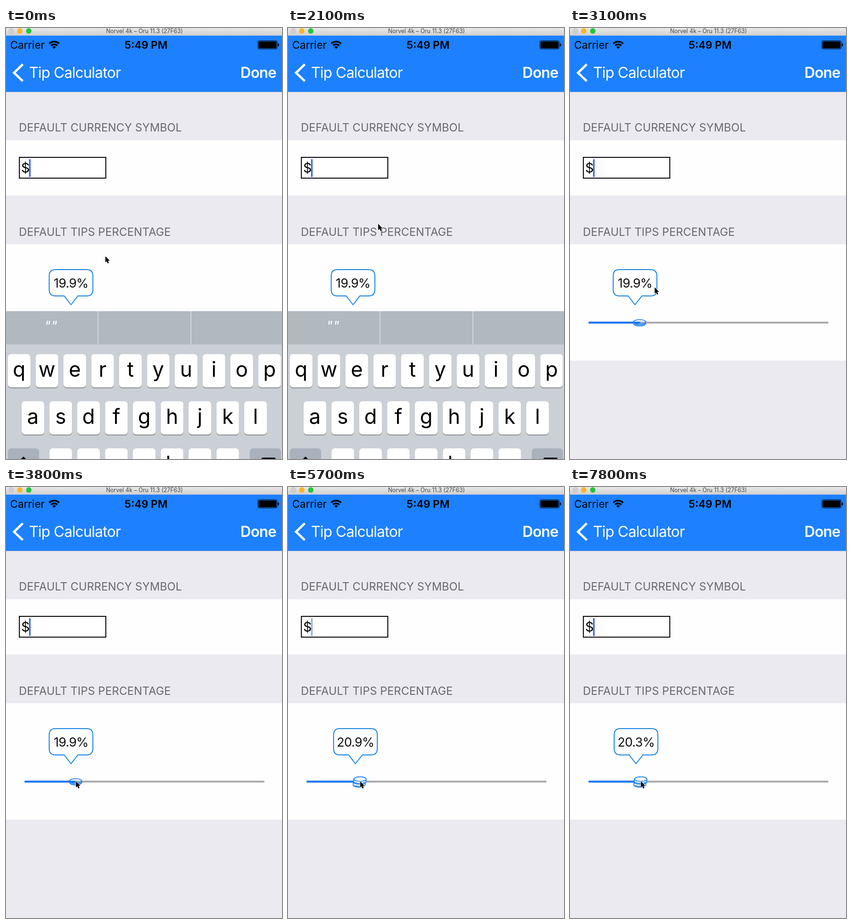
An HTML page for the animation above (8000 ms loop, 600 by 933 pixels).

```html
<!DOCTYPE html>
<html lang="en">
<head>
<meta charset="utf-8">
<title>Tip settings</title>
<style>
  html, body { margin: 0; width: 100%; height: 100%; overflow: hidden; background: #ebeaf0; }
  svg { display: block; width: 100vw; height: 100vh; }
  text { font-family: Inter, Roboto, "Liberation Sans", sans-serif; }
  .nav { font-size: 32px; letter-spacing: -.8px; fill: #fff; }
  .head { font-size: 24px; letter-spacing: .13px; fill: #69686e; }
  .letter { font-size: 45px; text-anchor: middle; }
  .bold { font-weight: 600; }
</style>
</head>
<body>
<svg viewBox="0 0 600 933" xmlns="http://www.w3.org/2000/svg">
  <defs>
    <linearGradient id="chrome" x2="0" y2="1">
      <stop offset="0" stop-color="#e9e8e9"/>
      <stop offset="1" stop-color="#d1d0d1"/>
    </linearGradient>
  </defs>

  <rect width="600" height="933" fill="#ebeaf0"/>
  <rect y="243" width="600" height="119.5" fill="#fefeff"/>
  <rect y="468" width="600" height="252" fill="#fefeff"/>

  <rect y="16" width="600" height="122" fill="#1c80ff"/>
  <rect y="138" width="600" height="1" fill="#a8b4cc"/>
  <rect width="600" height="16.5" fill="url(#chrome)"/>
  <circle cx="11.5" cy="6.5" r="5.5" fill="#d0cfd0" stroke="#bcbbbc" stroke-width=".8"/>
  <circle cx="30" cy="6.5" r="5.9" fill="#fdb32a"/>
  <circle cx="49.5" cy="6.5" r="5.9" fill="#25c53c"/>
  <text x="301" y="11" font-size="12.5" text-anchor="middle" fill="#474647">Norvel 4k – Oru 11.3 (27F63)</text>

  <text x="9" y="45" font-size="23">Carrier</text>
  <g fill="none" stroke="#000" stroke-width="3.4">
    <path d="M94 34A15.2 15.2 0 0 1 115.5 34"/>
    <path d="M98 38.3A9.5 9.5 0 0 1 111.5 38.3"/>
  </g>
  <path d="M104.7 45L100.8 41A5.6 5.6 0 0 1 108.7 41Z"/>
  <text class="bold" x="304.5" y="45" font-size="23" text-anchor="middle">5:49 PM</text>
  <rect x="547.5" y="27.5" width="42" height="18" rx="3" fill="none" stroke="#000"/>
  <rect x="549" y="29" width="39" height="15" rx="1.5"/>
  <path d="M591 33a2.5 3.5 0 0 1 0 7z"/>

  <path d="M36.5 78.5L17.5 97L36.5 115" fill="none" stroke="#fff" stroke-width="5"/>
  <text class="nav" x="50" y="108">Tip Calculator</text>
  <text class="nav bold" x="587.5" y="108" text-anchor="end">Done</text>

  <text class="head" x="28" y="224">DEFAULT CURRENCY SYMBOL</text>
  <text class="head" x="28" y="449.5">DEFAULT TIPS PERCENTAGE</text>

  <rect x="29" y="280" width="188" height="45" fill="#fff" stroke="#000" stroke-width="2"/>
  <text x="33" y="313" font-size="29">$</text>
  <rect id="caret" x="50" y="284" width="3.6" height="38.5" rx="1" fill="#3d6fdc"/>

  <g id="bubble">
    <path d="M-34 523H34Q47.5 523 47.5 537V566Q47.5 580 34 580H15L0 599L-15 580H-34Q-47.5 580 -47.5 566V537Q-47.5 523 -34 523Z" fill="#fff" stroke="#1283e6" stroke-width="2"/>
    <text id="value" y="562" font-size="27.3" letter-spacing="-.7" text-anchor="middle" fill="#111"></text>
  </g>

  <g stroke-width="4" stroke-linecap="round">
    <path d="M42 637.8H560" stroke="#a9a8ad"/>
    <path id="fill" stroke="#0d74f6"/>
  </g>
  <g id="coin" fill="none" stroke="#0d78f0" stroke-width="1.7">
    <ellipse cy="636.3" rx="13.3" ry="5"/>
    <path d="M-13.3 637V639.5A13.3 5.5 0 0 0 13.3 639.5V637"/>
    <path d="M-11 641.3A13.3 5.5 0 0 0 11 641.3" stroke-width="3" stroke-dasharray="1.5 1.5"/>
  </g>
  <g id="stack" stroke="#0d78f0" stroke-width="1.7" fill="#fff">
    <path d="M-14.5 641V645A13 4.8 0 0 0 11.5 645V641Z"/>
    <path d="M-12 646A13 4.8 0 0 0 9 646" fill="none" stroke-width="3" stroke-dasharray="2 1.3"/>
    <path d="M-13.5 633V638.5A13.5 5 0 0 0 13.5 638.5V633Z"/>
    <path d="M-12 639A13.5 5 0 0 0 12 639" fill="none" stroke-width="3.2" stroke-dasharray="2 1.3"/>
    <ellipse cx=".5" cy="632.3" rx="13.5" ry="4.9"/>
  </g>

  <g id="keyboard">
    <rect y="613" width="600" height="320" fill="#cbcfd6"/>
    <rect y="613" width="600" height="72" fill="#b0b8c0"/>
    <path d="M200 613V685M402 613V685" stroke="#d3d8dd" stroke-width="2"/>
    <text x="98" y="655" font-size="29" font-style="italic" letter-spacing="1" text-anchor="middle" fill="#fff">""</text>
    <g id="keys"></g>
    <path d="M18 949L38 930.5L58 949" fill="none" stroke="#000" stroke-width="4"/>
    <path d="M546 948L558 932H584V948" fill="none" stroke="#000" stroke-width="4" stroke-linejoin="round"/>
  </g>

  <path id="mouse" d="M0 0V13.5L3.1 10.7L5.2 15.7L7.7 14.6L5.6 9.8H9.5Z" stroke="#fff" stroke-width="1.2" paint-order="stroke"/>
</svg>
<script>
const LOOP = 8000, STEP = 100;
const $ = id => document.getElementById(id);
const SVG = "http://www.w3.org/2000/svg";

function add(tag, attrs, label = "") {
  const el = document.createElementNS(SVG, tag);
  for (const name in attrs) el.setAttribute(name, attrs[name]);
  el.textContent = label;
  $("keys").append(el);
}

function addKey(x, y, width, color, label) {
  add("rect", { x, y: y + 2, width, height: 72, rx: 7, fill: "#8b8f95" });
  add("rect", { x, y, width, height: 72, rx: 7, fill: color });
  if (label) add("text", { x: x + width / 2, y: y + 49, class: "letter" }, label);
}

[["qwertyuiop", 4, 706], ["asdfghjkl", 34, 808], ["zxcvbnm", 94.5, 910]].forEach(([row, x, y]) =>
  [...row].forEach((ch, i) => addKey(x + i * 60.5, y, 49, "#fff", ch)));
[4, 530].forEach(x => addKey(x, 910, 68, "#a9b1bc"));

// Tip percentage while the slider is dragged: [time, value]
const tips = [
  [4000, 19.9], [4100, 20.4], [4200, 24], [4400, 37], [4500, 38.7],
  [4600, 34], [4800, 22.3], [4900, 22.3], [5000, 23.4], [5400, 21],
  [5500, 21], [5800, 20.8], [6000, 20.8], [6400, 19.9], [6500, 19.9],
  [6600, 19.7], [6800, 20.7], [6900, 20.7], [7300, 20.4], [7700, 20.4], [7800, 20.3]
];

// Pointer before the drag: [time, x, y]
const moves = [
  [0, 216, 494], [400, 282, 527], [500, 282, 527], [1000, 300, 640],
  [1400, 262, 560], [1900, 196, 424], [2500, 196, 424],
  [3400, 178, 630], [3500, 172, 641], [3800, 152, 637]
];

function track(points, t, k = 1) {
  const i = points.findIndex(p => p[0] > t);
  if (i === 0) return points[0][k];
  if (i < 0) return points[points.length - 1][k];
  const a = points[i - 1], b = points[i];
  return a[k] + (b[k] - a[k]) * (t - a[0]) / (b[0] - a[0]);
}

const moveTo = (id, x, y = 0) => $(id).setAttribute("transform", `translate(${x} ${y})`);
const show = (id, on) => $(id).setAttribute("visibility", on ? "visible" : "hidden");

function draw(ms) {
  const t = Math.floor(ms % LOOP / STEP) * STEP;
  const tip = track(tips, t);
  const thumb = 53 + 4.94 * tip;
  const blink = .55 + .75 * Math.cos(2 * Math.PI * (t / 1000 + .05));

  $("caret").setAttribute("opacity", Math.max(0, Math.min(1, blink)));
  show("keyboard", t < 2400);

  $("value").textContent = tip.toFixed(1) + "%";
  moveTo("bubble", 33.3 + 5.43 * tip);
  $("fill").setAttribute("d", `M42 637.8H${thumb}`);
  moveTo("coin", thumb);
  moveTo("stack", thumb);
  show("coin", tip < 20);
  show("stack", tip >= 20);

  if (t < 4000) moveTo("mouse", track(moves, t), track(moves, t, 2));
  else moveTo("mouse", thumb + .8, 637);
}

function tick(now) {
  draw(now);
  requestAnimationFrame(tick);
}
draw(0);
requestAnimationFrame(tick);
</script>
</body>
</html>
```
